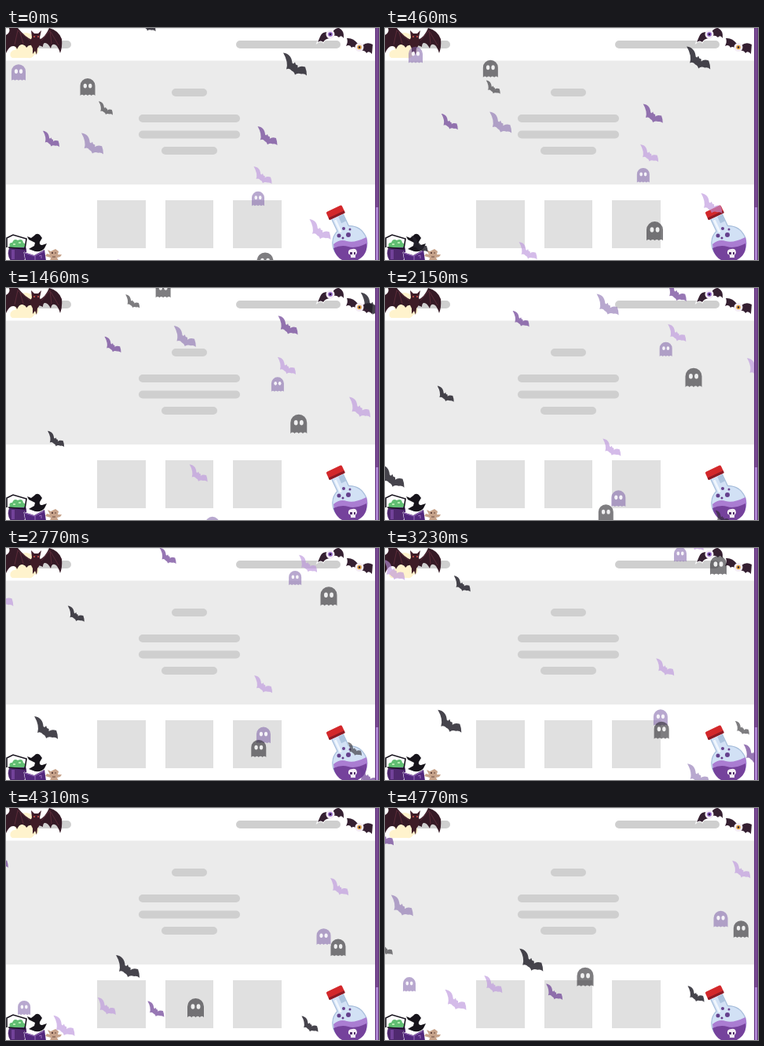
Recreate the animation shown at these times as an HTML page. Size 475 by 295 pixels, loop 4.85 s.

```html
<!DOCTYPE html>
<html lang="en">
<head>
<meta charset="utf-8">
<title>Halloween page</title>
<style>
html, body { margin: 0; width: 100%; height: 100%; overflow: hidden; background: #fff; }
svg { display: block; }
</style>
</head>
<body>
<svg width="475" height="295" viewBox="0 0 475 295">
  <defs>
    <path id="bat" transform="translate(-15 -14.5)" d="M0 0C7 1 11 5 11.500 13L13 14L15 12L16 15L18.500 16V19Q22 16 28 18Q30 23 30 29Q27 26 23 27Q18 25 15 28Q14 24 11 23Q8 19 4 21Q7 12 0 0Z"/>
    <g id="ghost" transform="translate(-10 -11.5)">
      <path d="M0 10a10 10 0 0 1 20 0V23q-2.500-2.500-5 0q-2.500-2.500-5 0q-2.500-2.500-5 0q-2.500-2.500-5 0Z"/>
      <g fill="#fff" fill-opacity=".88"><ellipse cx="6.600" cy="10" rx="2.300" ry="3.100"/><ellipse cx="13.400" cy="10" rx="2.300" ry="3.100"/></g>
    </g>
    <g id="eye"><circle r="5.500" fill="#f4ecf4"/><circle r="2.800"/><circle r="1.200" fill="#251a31"/></g>
  </defs>

  <!-- page -->
  <path fill="#fff" d="M0 0h475v295H0z"/>
  <path fill="#e8e8e8" d="M0 0h470v1H0z"/>
  <path fill="#ebebeb" d="M0 41.500h470V199H0z"/>
  <path fill="#e0e0e0" d="M116 219h62v61h-62zM203 219h61v61h-61zM289 219h62v61h-62z"/>
  <path stroke="#cfcfcf" stroke-width="10" stroke-linecap="round" d="M40 21H78M298 21H421M216 82H251M174 115H293M174 135.500H293M203 156H264"/>

  <!-- large bat and moon -->
  <path fill="#fff3cd" d="M10 20Q12 6 26 6Q40 8 41 24Q44 33 36 34Q34 39 28 38H8Q4 36 6 31Q9 27 13 28Z"/>
  <path fill="#351a26" d="M33 15Q25 12 15 0H4Q6 6 0 9V32Q4 23 9 23Q13 23 14 27Q17 20 21 21Q25 22 26 25Q29 21 33 22ZM42 15Q50 12 55 0Q67 3 71 14Q72 24 69 32Q66 22 62 21Q58 20 57 26Q53 18 49 19Q47 20 47 24L42 22Z"/>
  <path fill="#3f1c27" d="M32 3L36 7H41L45 3L43 12Q46 19 40 26L39 34L37 29L34 33V26Q29 18 33 12Z"/>
  <path fill="none" stroke="#65303e" stroke-width=".8" d="M31 16L15 3L11 21M18 6L22 20M45 16L56 3L58 20M57 5L67 22"/>
  <path stroke="#d95850" stroke-width="1.500" d="M35 11h2M40 11h2"/>

  <!-- eyeball bats -->
  <path fill="#352031" stroke="#fff" stroke-width="2" paint-order="stroke" d="M409 5Q402 5 400 11L397 18Q401 15 404 18Q406 14 412 13ZM416 5Q419 0 424 0Q431 3 430 13Q427 8 424 12Q420 8 416 11ZM448 20Q442 12 434 13Q436 17 433 23Q438 20 440 25Q443 22 448 28ZM454 22Q460 17 467 21L466 33Q462 28 459 32Q457 28 452 29Z"/>
  <use href="#eye" x="413" y="8" fill="#8455bd"/>
  <use href="#eye" x="450" y="24.500" fill="#e6a84b"/>

  <!-- cauldron, cat, book and doll -->
  <path fill="#502970" d="M5 278H25Q28 286 23 296H6Q0 287 5 278Z"/>
  <path fill="#72429a" d="M7 282h4v12h-4z"/>
  <path fill="#61bd72" d="M5 279Q3 272 8 273Q10 267 15 270Q21 267 22 273Q27 275 23 279Z"/>
  <path fill="#b2e9ae" d="M9 274h3v2h-3zM16 272h3v2h-3z"/>
  <path fill="none" stroke="#17131d" stroke-width="1.600" d="M1 279V267L9 263L26 268L24 281L3 279"/>
  <path fill="#17141b" d="M36 264Q39 260 43 263L46 267L43 272Q42 276 46 276L52 274L49 280Q46 285 37 284L29 281L36 277L37 273L29 269L27 265L32 267Z"/>
  <path fill="#51277c" stroke="#fff" paint-order="stroke" d="M23 285L36 289L49 282L51 296H25Z"/>
  <path fill="none" stroke="#9a70bb" d="M24 286L36 290L48 284M37 290V295M42 290l3-1v4"/>
  <path fill="#c7a38b" d="M53 282L57 284L63 281L67 284L66 288L71 288L69 291L65 292L67 296H56L57 292L50 290L52 287L56 288Z"/>
  <path fill="none" stroke="#66483f" d="M58 285l2 2m0-2l-2 2M63 285v2M59 291h4"/>

  <!-- potion -->
  <g transform="rotate(-25 438 274)">
    <path fill="#d2e1f5" stroke="#a7bedb" stroke-width="1.200" d="M430 233H446V253Q460 259 460 275A22 22 0 1 1 430 253Z"/>
    <path fill="#f0f6fd" d="M432 239h3v17h-3z"/>
    <path fill="#adc4df" d="M439 237h7v9h-7z"/>
    <rect x="427" y="225" width="22" height="11" rx="2" fill="#d3282b"/>
    <path fill="#8c1a25" d="M427 233h22v3h-22z"/>
  </g>
  <path fill="#aa7dd2" d="M417 275Q425 268 434 271T459 266Q464 283 448 294H428Q418 290 417 275Z"/>
  <path fill="#75429c" d="M417 280Q427 275 436 278T459 274Q461 288 448 295H428Q420 291 417 280Z"/>
  <g fill="#66418e"><circle cx="424" cy="264" r="2.500"/><circle cx="430" cy="255" r="2"/><circle cx="436" cy="263" r="3"/><circle cx="429" cy="267" r="1.500"/><circle cx="438" cy="256" r="1.500"/></g>
  <path fill="#f3edf5" d="M436 287Q435 281 441 281Q447 280 447 286L445 289V292H439V289Z"/>
  <path fill="#55306f" d="M438 285h3v3h-3zM443 285h2v3h-2z"/>

  <svg id="swarm" width="470" height="295"></svg>

  <!-- scrollbar -->
  <path fill="#63367d" d="M470 0h5v295h-5z"/>
  <path fill="#774891" d="M471 0h3v228h-3z"/>
  <path fill="#b087d4" d="M471 228h3v67h-3z"/>
</svg>
<script>
const LOOP = 4850, STEPS = 63, WIDTH = 470, HEIGHT = 295;
const DARK = "#25222cd8", GREY = "#2c2a2f9c", PURPLE = "#6b3f95b4",
      MAUVE = "#7d60a88c", LILAC = "#bb93dca0";

const swarm = document.getElementById("swarm");
const flyers = [];

// x, y and velocity per step; entries say where it comes back in along the opposite edge
function fly(shape, size, colour, x, y, vx, vy, ...entries) {
  const node = document.createElementNS(swarm.namespaceURI, "use");
  node.setAttribute("href", "#" + shape);
  node.setAttribute("fill", colour);
  swarm.append(node);
  const scale = size / (shape === "bat" ? 30 : 20);
  flyers.push({ node, scale, margin: size * 0.55, x, y, vx, vy, entries });
}

fly("ghost", 18, MAUVE, 16, 56.5, 3.83, -3.72, 259);
fly("ghost", 19, GREY, 104, 75, 5.06, -3.88, 256);
fly("bat", 18, GREY, 127, 102, 1.8, -4.48, 424.3, 205);
fly("bat", 21, PURPLE, 57.5, 141, 4.13, -3.64, 133);
fly("bat", 28, MAUVE, 110, 147, 6.2, -4.5, 368, 151);
fly("bat", 30, DARK, 368, 46, 5.2, -1.35, 246);
fly("bat", 25, PURPLE, 333, 137, 1.37, -4.72, 455.5, 78);
fly("bat", 23, LILAC, 327, 187, 1.6, -4.64, 109);
fly("ghost", 16, MAUVE, 321, 217, 1.31, -4.97, 10);
fly("bat", 27, LILAC, 400, 256, 2.66, -5.5, 83, 58);
fly("ghost", 21, GREY, 330, 297.5, 2.25, -6.56, 223.5);
fly("bat", 21, DARK, 180, -6, 1.51, -6.37, 36.4, 379.4);
fly("bat", 23, LILAC, 153, 305, 4.85, -3.66);

function place({ node, scale, margin, x, y, vx, vy, entries }, steps) {
  let next = 0;
  for (let i = 0; i < steps; i++) {
    x += vx;
    y += vy;
    if (y < -margin) [x, y] = [entries[next++], HEIGHT + margin];
    else if (x > WIDTH + margin) [x, y] = [-margin, entries[next++]];
  }
  node.setAttribute("transform", `translate(${x} ${y}) scale(${scale})`);
}

function draw() {
  const step = Math.floor(performance.now() % LOOP / LOOP * STEPS + 0.1) % STEPS;
  flyers.forEach(flyer => place(flyer, step));
  requestAnimationFrame(draw);
}
draw();
</script>
</body>
</html>
```
